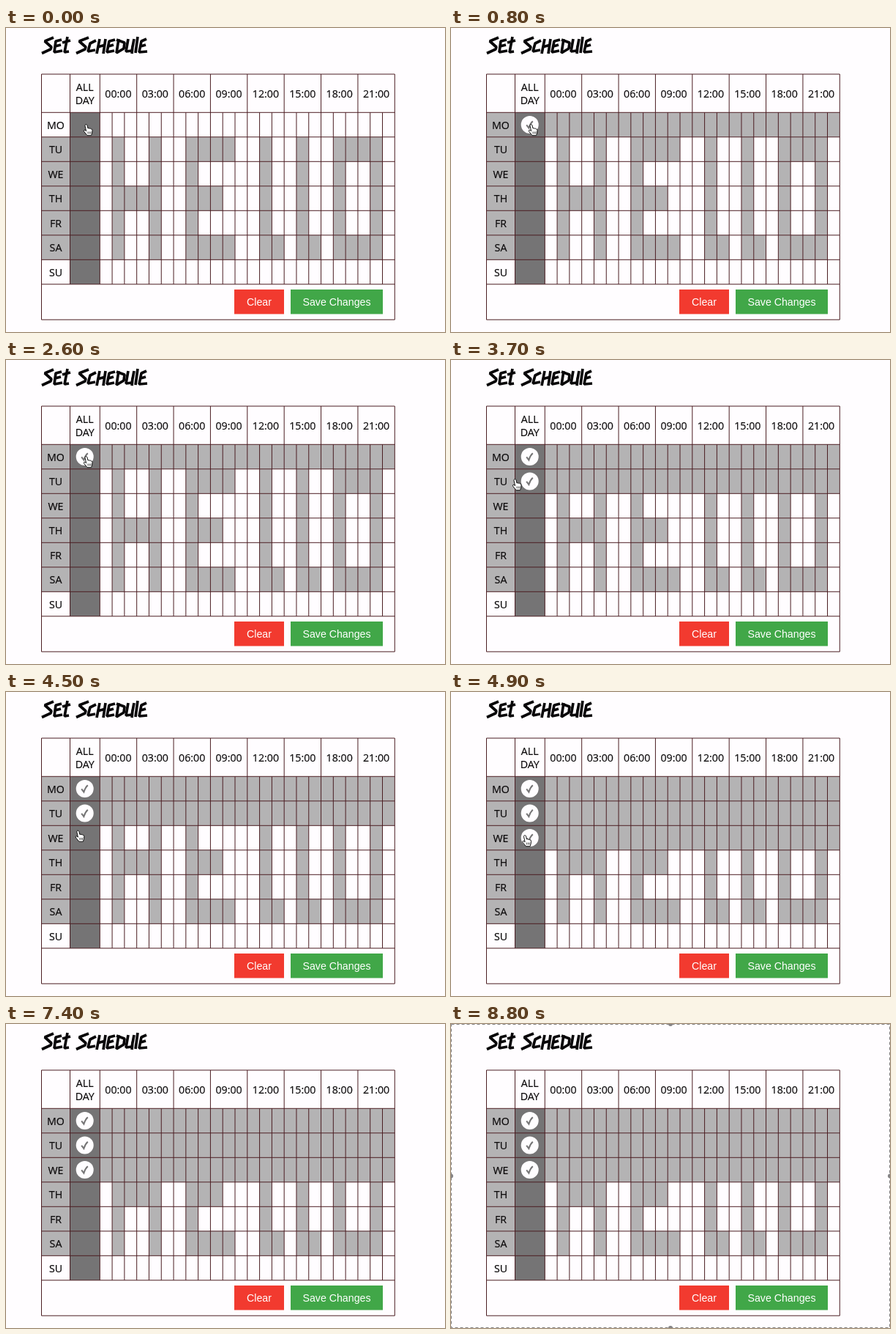
Animation, 600 px wide and 415 px high, one loop 8900 ms. Source, as an HTML page:

```html
<!DOCTYPE html>
<html lang="en">
<head>
<meta charset="utf-8">
<title>Set Schedule</title>
<style>
  html, body { margin: 0; width: 100%; height: 100%; overflow: hidden; background: #fffdff; }
  svg { display: block; width: 600px; height: 415px; }
  .label { font: 14.2px "Open Sans", "Noto Sans", sans-serif; text-anchor: middle; fill: #0c0a0b; stroke: #0c0a0b; stroke-width: .2px; }
  .button { font: 14.2px "Liberation Sans", Arial, sans-serif; text-anchor: middle; fill: #fff; }
</style>
</head>
<body>
<svg id="stage" viewBox="0 0 600 415"></svg>
<script>
const LOOP = 8900, STEP = 100;
const LEFT = 48.5, DAY_X = 87.5, HOUR_X = 128.3, RIGHT = 531.3;
const TOP = 63, ROW_Y = 115.3, ROW_H = 33.5, BOTTOM = 398.2;
const HOUR_W = (RIGHT - HOUR_X) / 24, GRID_END = ROW_Y + ROW_H * 7;
const GRAY = "#b4b3b4", DARK = "#757475", LINE = "#4b1d22";

const stage = document.getElementById("stage");

function add(tag, attrs, parent = stage, text) {
  const el = document.createElementNS("http://www.w3.org/2000/svg", tag);
  for (const key in attrs) el.setAttribute(key, attrs[key]);
  if (text) el.textContent = text;
  parent.appendChild(el);
  return el;
}
const box = (x, y, width, height, fill, parent) => add("rect", { x, y, width, height, fill }, parent);
const label = (x, y, text, cls = "label") => add("text", { x, y, class: cls }, stage, text);
const show = (el, on) => el.setAttribute("visibility", on ? "visible" : "hidden");
const hourX = i => HOUR_X + i * HOUR_W;
const rowY = i => ROW_Y + i * ROW_H;

// Brush lettering of the heading
const heading = add("g", { fill: "none", stroke: "#080608", "stroke-width": 3.7, "stroke-linejoin": "bevel", role: "img" });
add("title", {}, heading, "Set Schedule");
[
  "M65 13L53 18L62 26L61 29L49 34.5",
  "M76 16L68 18L66 33L77 31M67 25L75 23",
  "M84 12L80 33L86 32M77 20L88 17",
  "M113 13L100 18L109 26L108 29L96 34.5",
  "M123 17L115 21L112 32L122 30",
  "M128 15L124 35M136 15L133 35M125 26L136 23",
  "M149 16L141 18L138 33L148 31M140 25L147 23",
  "M154 15L151 34L161 28L162 20L151 16",
  "M167 15L164 32L172 31L175 15M173 25L172 35",
  "M180 12L177 34",
  "M192 15L185 18L182 33L193 32M184 25L191 23"
].forEach(d => add("path", { d }, heading));

// Table fills
const days = ["MO", "TU", "WE", "TH", "FR", "SA", "SU"];
const sides = [1, 4, 7, 13, 16, 19, 22];
const hours = [
  [],
  [...sides, 8, 9, 10, 20, 21],
  sides,
  [...sides, 2, 3, 8, 9],
  sides,
  [...sides, 8, 9, 10, 14, 17, 20, 21],
  []
];
box(DAY_X, ROW_Y, HOUR_X - DAY_X, ROW_H * 7, DARK);
hours.forEach((list, row) => {
  if (list.length) box(LEFT, rowY(row), DAY_X - LEFT, ROW_H, GRAY);
  list.forEach(h => box(hourX(h), rowY(row), HOUR_W, ROW_H, GRAY));
});

const checks = [0, 1, 2].map(row => {
  const g = add("g", {}), y = rowY(row), mid = y + ROW_H / 2;
  box(LEFT, y, DAY_X - LEFT, ROW_H, GRAY, g);
  box(HOUR_X, y, RIGHT - HOUR_X, ROW_H, GRAY, g);
  add("circle", { cx: 107.7, cy: mid, r: 12, fill: "#fffdff" }, g);
  add("path", {
    d: `M103.2 ${mid + .3}l3.2 4.2q1.8-6 5.4-9.2`,
    fill: "none", stroke: DARK, "stroke-width": 2
  }, g);
  return g;
});

// Table lines
let lines = `M${LEFT} ${TOP}H${RIGHT}V${BOTTOM}H${LEFT}ZM${DAY_X} ${TOP}V${GRID_END}`;
for (let i = 0; i < 8; i++) lines += `M${LEFT} ${rowY(i)}H${RIGHT}`;
for (let i = 0; i < 24; i++) lines += `M${hourX(i)} ${i % 3 ? ROW_Y : TOP}V${GRID_END}`;
add("path", { d: lines, fill: "none", stroke: LINE, "stroke-width": 1 });

label(107.7, 85.5, "ALL");
label(107.7, 104, "DAY");
for (let i = 0; i < 8; i++) label(hourX(i * 3 + 1.5), 95, String(i * 3).padStart(2, "0") + ":00");
days.forEach((day, i) => label(68, rowY(i) + 22.3, day));

box(312, 357, 68, 33.5, "#f23a2f");
label(346, 378.7, "Clear", "button");
box(389, 357, 126, 33.5, "#41a748");
label(452, 378.7, "Save Changes", "button");

// Selection frame
const frame = add("g", { fill: "#858385" });
add("rect", { x: .5, y: .5, width: 599, height: 414, fill: "none", stroke: "#858385", "stroke-dasharray": "4 3" }, frame);
[[300, 0], [300, 415], [0, 207.5], [600, 207.5]].forEach(([cx, cy]) => add("circle", { cx, cy, r: 3 }, frame));

// Pointer
const hand = add("g", { stroke: "#111", "stroke-width": 1, "stroke-linejoin": "round" });
add("path", {
  d: "M2.8 .8Q4.4 .2 5 1.8L6 6Q7.4 5.2 8.2 6.3Q9.6 5.6 10.3 6.9Q12 6.6 12 8.4L11.7 12L10.6 15.7H5L1 10.8Q-.3 8.8 1 8.3Q2.2 8 3.6 9.8L2 2.6Q1.8 1.2 2.8 .8Z",
  fill: "#fff"
}, hand);
add("path", { d: "M6 10.5v3M8 10.5v3M9.8 10.5v3", fill: "none", "stroke-width": .7 }, hand);
const arrow = add("path", { d: "M0 0V15L3.5 11.8L6 17L8.5 16L6.2 11H11Z", fill: "#080808", stroke: "#fff", "stroke-width": .6 });

const moves = [
  [0, 106, 131], [3000, 106, 131], [3600, 84, 162], [4000, 84, 162],
  [4700, 97.5, 195], [5300, 97.5, 195], [6000, 523, 408], [6200, 528, 424], [LOOP, 528, 424]
];

function pointerAt(t) {
  const i = moves.findIndex(m => m[0] > t);
  const [t0, x0, y0] = moves[i - 1], [t1, x1, y1] = moves[i];
  const p = (t - t0) / (t1 - t0), e = p * p * (3 - 2 * p);
  return [x0 + (x1 - x0) * e, y0 + (y1 - y0) * e];
}

function draw(time) {
  const t = Math.floor((time % LOOP) / STEP) * STEP;
  show(checks[0], (t >= 300 && t < 1600) || t >= 2600);
  show(checks[1], t >= 3600);
  show(checks[2], t >= 4800);
  show(frame, t >= 7600);

  const [x, y] = pointerAt(t), overTable = y < 391;
  show(hand, overTable);
  show(arrow, !overTable);
  (overTable ? hand : arrow).setAttribute("transform", `translate(${x} ${y})`);
}

const start = performance.now();
function tick() {
  draw(performance.now() - start);
  requestAnimationFrame(tick);
}
draw(0);
requestAnimationFrame(tick);
</script>
</body>
</html>
```
